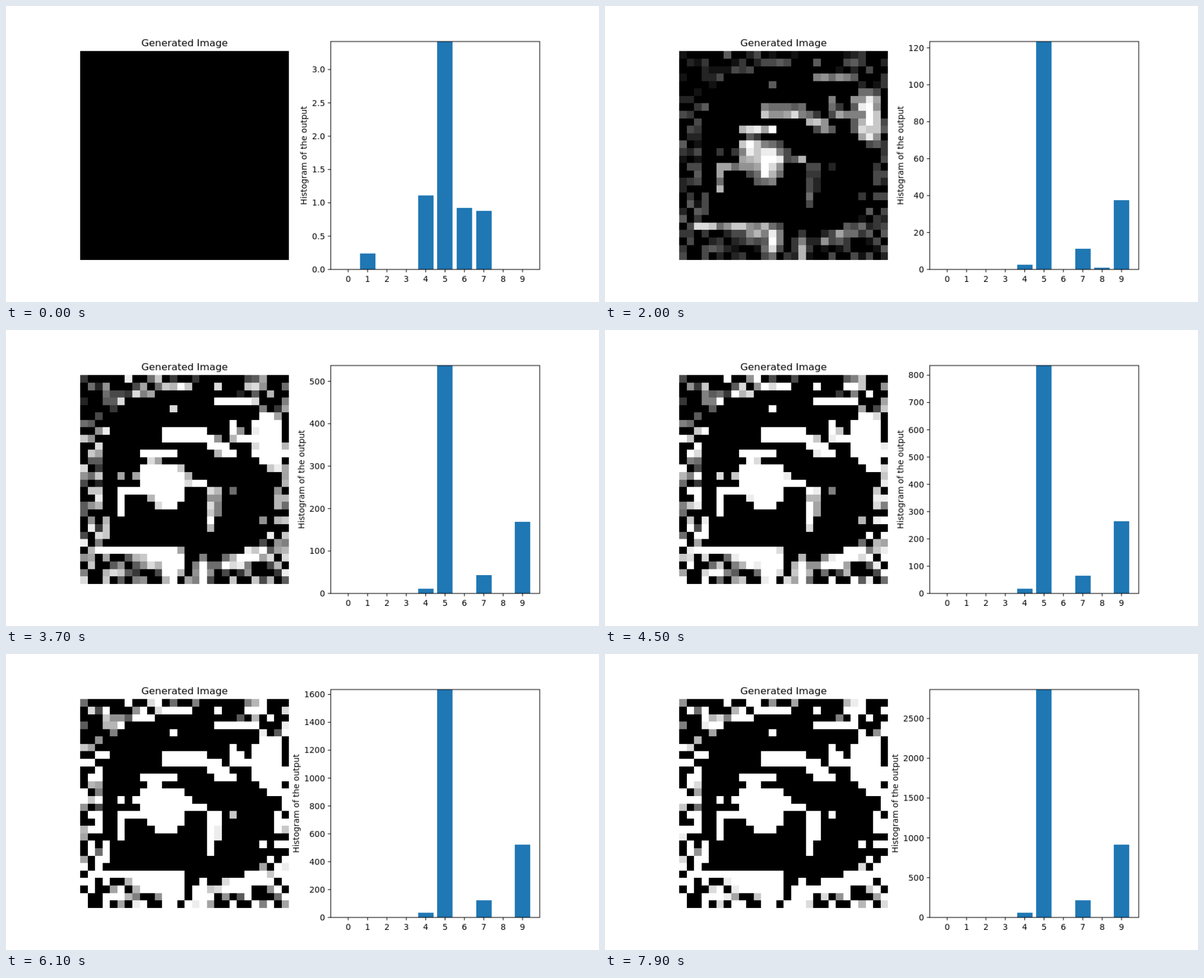
An HTML page with a canvas for the animation above (8 s loop, 1058 by 529 pixels).

```html
<!DOCTYPE html>
<html lang="en">
<head>
<meta charset="utf-8">
<title>Generated Image</title>
<style>
  html, body { margin: 0; width: 100%; height: 100%; overflow: hidden; background: #fff; }
  canvas { display: block; width: 1058px; height: 529px; }
</style>
</head>
<body>
<canvas id="stage" width="1000" height="500"></canvas>
<script>
// The figure is laid out on 1000 x 500 and scaled up to the stage.
const ctx = document.getElementById('stage').getContext('2d');
const LOOP = 8000, STEP = 100, HOLD = 600, N = 28;
const FONT = '"DejaVu Sans", sans-serif';
const SMALL = 13.89, LARGE = 16.67;
const image = { x: 125, y: 76.4, size: 352.3 };
const axes = { left: 547.6, right: 900, top: 60, bottom: 445 };
const axesHeight = axes.bottom - axes.top;

// Bright forms: thick strokes through a few cells; they brighten from the core outwards.
const strokes = [
  { rate: 0.1, radius: 2.2, path: [[9, 13], [12, 13.5], [11, 15.5]] },
  { rate: 0.08, radius: 0.5, path: [[8, 10], [12, 10]] },
  { rate: 0.1, radius: 2.1, path: [[24.7, 6.3], [25, 10]] },
  { rate: 0.08, radius: 1.3, path: [[9, 23.3], [12, 23.7], [12, 26]] },
  { rate: 0.08, radius: 0.95, path: [[11, 7.6], [16, 7.8], [19.5, 10]] },
  { rate: 0.05, radius: 0.5, path: [[5, 18], [5, 15], [9, 15]] },
  { rate: 0.06, radius: 0.7, path: [[13, 13.5], [16, 14]] },
  { rate: 0.05, radius: 0.7, path: [[17.5, 15], [17.2, 20]] },
  { rate: 0.06, radius: 0.5, path: [[2, 23], [9, 23]] },
  { rate: 0.05, radius: 1.1, path: [[19, 25], [24, 23]] },
  { rate: 0.05, radius: 1.1, path: [[16, 25], [16, 27]] },
  { rate: 0.06, radius: 0.9, path: [[20, 6], [20.5, 8], [23, 8]] },
  { rate: 0.04, radius: 0.5, path: [[11, 1], [14, 1]] },
  { rate: 0.05, radius: 0.5, path: [[18, 3], [22, 3]] },
];

let seed = 20;
function random() {
  seed = (seed * 1664525 + 1013904223) % 4294967296;
  return seed / 4294967296;
}

function distance(x, y, [ax, ay], [bx, by]) {
  const dx = bx - ax, dy = by - ay;
  const t = ((x - ax) * dx + (y - ay) * dy) / (dx * dx + dy * dy);
  const f = Math.max(0, Math.min(1, t));
  return Math.hypot(x - ax - f * dx, y - ay - f * dy);
}

function strokeRate(x, y, { rate, radius, path }) {
  const d = Math.min(...path.slice(1).map((p, i) => distance(x, y, path[i], p)));
  return d > radius ? 0 : rate * (1 - 0.7 * d / radius);
}

// Speckle fills the border around a mostly dark oval.
function speckleRate(x, y) {
  const outside = (Math.abs(x - 14.2) / 11.8) ** 3 + (Math.abs(y - 13) / 11.3) ** 3 > 1;
  const present = random() < (outside ? 0.5 : 0.03);
  const speed = random();
  return present ? 0.006 + 0.03 * speed : 0;
}

const rates = Array.from({ length: N * N }, (_, i) => {
  const x = i % N, y = Math.floor(i / N);
  const speckle = speckleRate(x, y);
  const form = Math.max(...strokes.map(s => strokeRate(x, y, s)));
  return form ? form * (0.65 + 0.7 * random()) : speckle;
});

function text(string, x, y, size = SMALL, align = 'center') {
  ctx.font = `${size}px ${FONT}`;
  ctx.textAlign = align;
  ctx.fillText(string, x, y);
}

function line(x1, y1, x2, y2) {
  ctx.beginPath();
  ctx.moveTo(x1, y1);
  ctx.lineTo(x2, y2);
  ctx.stroke();
}

function drawImage(k) {
  const gain = k * k / (k + 5);
  const edge = (start, i) => Math.round(start + i * image.size / N);
  for (let i = 0; i < N * N; i++) {
    const c = i % N, r = Math.floor(i / N);
    const x = edge(image.x, c), y = edge(image.y, r);
    const v = 255 * Math.floor(Math.min(1, rates[i] * gain) * 14) / 14;
    ctx.fillStyle = `rgb(${v},${v},${v})`;
    ctx.fillRect(x, y, edge(image.x, c + 1) - x, edge(image.y, r + 1) - y);
  }
}

function tickStep(max) {
  const power = 10 ** Math.floor(Math.log10(max / 9));
  return [1, 2, 2.5, 5, 10].map(s => s * power).find(s => max / s <= 9);
}

// Bar heights as shares of the tallest bar.
function barShares(k) {
  const fade = Math.exp(-k / 1.5), x = k / 8;
  return {
    1: 0.07 * fade,
    4: 0.02 + 0.305 * fade,
    5: 1,
    6: 0.269 * fade,
    7: 0.07 + 0.187 / (1 + k / 1.8),
    8: 0.016 * (x * Math.exp(1 - x)) ** 3,
    9: 0.325 * k / (k + 1.05),
  };
}

function drawChart(k) {
  const max = 3.42 + 0.45 * k + 0.5 * k ** 2 + 0.00022 * k ** 3;
  const centre = digit => 577.05 + 32.66 * digit;

  ctx.fillStyle = '#1f77b4';
  for (const [digit, share] of Object.entries(barShares(k))) {
    const left = Math.round(centre(digit) - 13.06), right = Math.round(centre(digit) + 13.06);
    const top = Math.round(axes.bottom - axesHeight * share);
    ctx.fillRect(left, top, right - left, axes.bottom - top);
  }

  ctx.fillStyle = ctx.strokeStyle = '#000';
  ctx.lineWidth = 1.11;
  ctx.strokeRect(axes.left, axes.top, axes.right - axes.left, axesHeight);
  for (let d = 0; d < 10; d++) {
    line(centre(d), axes.bottom, centre(d), axes.bottom + 4.86);
    text(d, centre(d), 466);
  }

  const step = tickStep(max);
  const decimals = [0, 1, 2].find(n => Math.abs(step - step.toFixed(n)) < 1e-9);
  let widest = 0;
  for (let i = 0; i * step <= max; i++) {
    const y = axes.bottom - axesHeight * i * step / max;
    const label = (i * step).toFixed(decimals);
    line(axes.left - 4.86, y, axes.left, y);
    text(label, 538, Math.round(y + 5), SMALL, 'right');
    widest = Math.max(widest, ctx.measureText(label).width);
  }

  ctx.save();
  ctx.translate(Math.round(529.5 - widest), 252.5);
  ctx.rotate(-Math.PI / 2);
  text('Histogram of the output', 0, 0);
  ctx.restore();
}

function draw(now) {
  const k = Math.max(0, Math.floor((now % LOOP - HOLD) / STEP) + 1);
  ctx.fillStyle = '#fff';
  ctx.fillRect(0, 0, 1000, 500);
  drawImage(k);
  ctx.fillStyle = '#000';
  text('Generated Image', 301.1, 68, LARGE);
  drawChart(k);
  requestAnimationFrame(draw);
}
requestAnimationFrame(draw);
</script>
</body>
</html>
```
